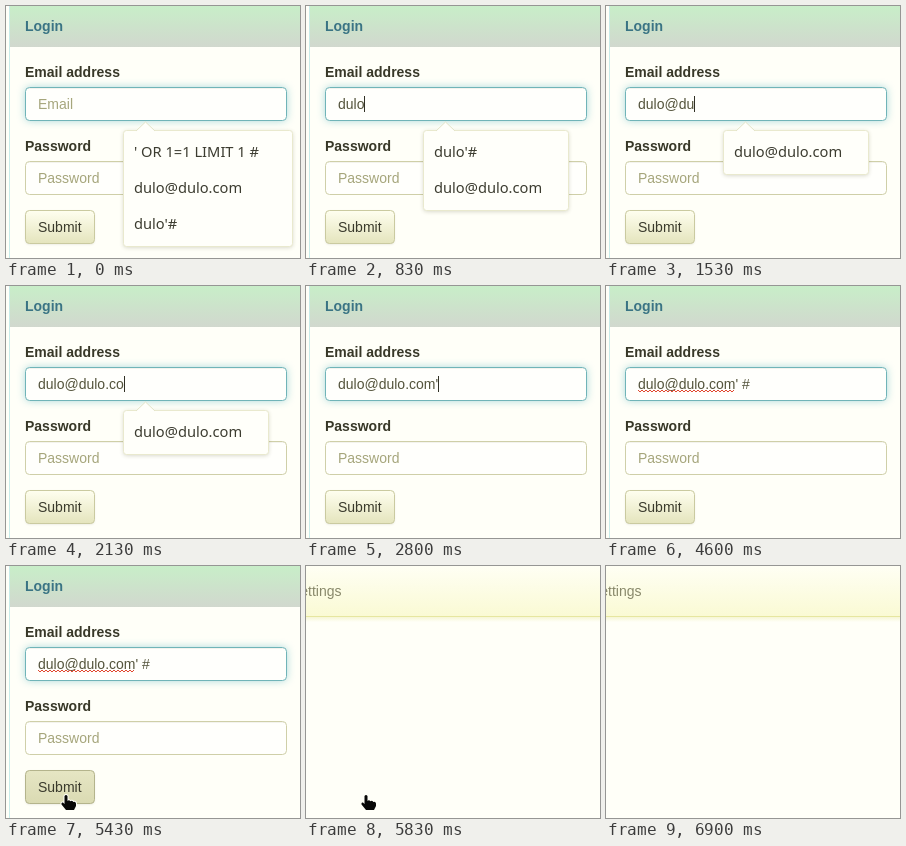
Animation, 294 px wide and 252 px high, one loop 7960 ms. Source, as an HTML page with a canvas:

```html
<!DOCTYPE html>
<html lang="en">
<head>
<meta charset="utf-8">
<title>Login form</title>
<style>
  html, body { margin: 0; width: 100%; height: 100%; overflow: hidden; background: #fffff8; }
  canvas { display: block; width: 294px; height: 252px; }
</style>
</head>
<body>
<canvas id="stage" width="294" height="252"></canvas>
<script>
const ctx = document.getElementById('stage').getContext('2d');
const W = 294, H = 252, LOOP = 7960;
const SANS = '14px "Liberation Sans", Arial, sans-serif';
const MENU = '14.67px "Noto Sans", "Open Sans", sans-serif';
const PAPER = '#fffff8';

const EMAIL = 'dulo@dulo.com';
const TYPED = EMAIL + "' #";
const KEY_TIMES = [210, 380, 550, 710, 1130, 1330, 1480, 1620, 1760, 1900, 2000, 2100, 2230, 2800, 3150, 3450];
const LAST_KEY = 3450, BLINK = 600;
const HOVER = 5230, PRESS = 5560, LOADED = 5830, HAND_OFF = 6500, LEAVE = 6800, GONE = 6900;
const POINTER = [[4660, 296, 222], [4860, 226, 233], [5060, 132, 236], [5230, 76, 231], [5340, 60, 229]];

function text(str, x, y, color, font = SANS, align = 'left') {
  ctx.font = font;
  ctx.fillStyle = color;
  ctx.textAlign = align;
  ctx.fillText(str, x, y);
}

function gradient(y0, y1, top, bottom) {
  const g = ctx.createLinearGradient(0, y0, 0, y1);
  g.addColorStop(0, top);
  g.addColorStop(1, bottom);
  return g;
}

function box(x, y, w, h, r, fill, border, glow) {
  ctx.save();
  ctx.beginPath();
  ctx.roundRect(x + .5, y + .5, w - 1, h - 1, r);
  if (glow) {
    ctx.shadowColor = glow.color;
    ctx.shadowBlur = glow.blur;
    ctx.shadowOffsetY = glow.dy || 0;
  }
  ctx.fillStyle = fill;
  ctx.fill();
  ctx.shadowColor = 'transparent';
  ctx.strokeStyle = border;
  ctx.stroke();
  ctx.restore();
}

function field(y, focused) {
  box(19, y, 262, 34, 4, '#fffffc', focused ? '#70b4b8' : '#cfcfa8',
    focused && { color: 'rgba(110,190,200,.65)', blur: 8 });
  ctx.fillStyle = 'rgba(60,60,30,.06)';
  ctx.fillRect(22, y + 1, 256, 1);
}

function squiggle(x0, x1, y) {
  ctx.beginPath();
  for (let x = x0; x <= x1; x += 2) ctx.lineTo(x, y + ((x - x0) % 4 ? 1 : -1));
  ctx.strokeStyle = '#e04830';
  ctx.lineWidth = 1;
  ctx.stroke();
}

function emailField(t, count) {
  field(81, t < PRESS);
  const value = TYPED.slice(0, count);
  text(value || 'Email', 32, 103, value ? '#54543c' : '#a6a67c');
  if (!value) return;
  const end = 32 + ctx.measureText(value).width;
  if (count >= 15) squiggle(32, 32 + ctx.measureText(EMAIL).width, 105);
  const caretOn = t < LAST_KEY || Math.floor((t - LAST_KEY) / BLINK) % 2 === 0;
  if (caretOn && t < PRESS) {
    ctx.fillStyle = '#303024';
    ctx.fillRect(Math.round(end), 90, 1, 16);
  }
}

function suggestions(count) {
  if (count === 0) return ["' OR 1=1 LIMIT 1 #", EMAIL, "dulo'#"];
  if (count < 5) return ["dulo'#", EMAIL];
  return count < EMAIL.length ? [EMAIL] : [];
}

function popup(items) {
  if (!items.length) return;
  const width = items.length === 3 ? 170 : 146;
  const height = 9 + 36 * items.length;
  box(117, 124, width, height, 3, '#fffffa', '#e9e9ce',
    { color: 'rgba(80,80,40,.25)', blur: 4, dy: 1 });
  ctx.beginPath();
  ctx.moveTo(130, 125);
  ctx.lineTo(139.5, 116);
  ctx.lineTo(149, 125);
  ctx.fillStyle = '#fffffa';
  ctx.fill();
  ctx.strokeStyle = '#e4e4c8';
  ctx.stroke();
  items.forEach((item, i) => text(item, 128, 151 + 36 * i, '#3c3c30', MENU));
}

function submitButton(t) {
  const hover = t >= HOVER, pressed = t >= PRESS;
  const fill = hover ? gradient(204, 238, '#e6e6c4', '#dadab2') : gradient(204, 238, '#fffff0', '#e4e4bc');
  box(19, 204, 70, 34, 4, pressed ? '#d8d8b0' : fill, hover ? '#b4b48c' : '#cacaa0',
    { color: 'rgba(60,60,30,.12)', blur: 2, dy: 1 });
  text('Submit', 32, 226, '#3a3a2c');
}

function loginPage(t) {
  ctx.fillStyle = gradient(0, 41, '#c8eec8', '#d1d8ce');
  ctx.fillRect(4, 0, W, 41);
  ctx.fillStyle = '#c8ecea';
  ctx.fillRect(3, 0, 1, H);
  const bold = 'bold ' + SANS;
  text('Login', 19, 25, '#3a7484', bold);
  text('Email address', 19, 71, '#383828', bold);
  text('Password', 19, 145, '#383828', bold);

  const count = KEY_TIMES.filter(k => k <= t).length;
  emailField(t, count);
  field(155, false);
  text('Password', 32, 177, '#a6a67c');
  submitButton(t);
  popup(suggestions(count));
}

function settingsPage() {
  ctx.fillStyle = gradient(0, 50, '#fffff4', '#fafad4');
  ctx.fillRect(0, 0, W, 50);
  ctx.fillStyle = '#e6e6a0';
  ctx.fillRect(0, 50, W, 1);
  ctx.fillStyle = gradient(51, 56, '#f6f6d4', PAPER);
  ctx.fillRect(0, 51, W, 5);
  text('Settings', 35.5, 30, '#88886a', SANS, 'right');
}

const ARROW = new Path2D('M0 0V15L3.6 11.8L6 17.5L8.6 16.4L6.2 10.9H11Z');
const HAND = new Path2D('M-1.5 1Q0 -1 1.5 1V6Q3 4.5 4.5 6.3Q6 5 7.3 7Q9.5 6 10 8.5V11L8 15H0L-4.5 9.5Q-5 7 -3 7.5L-1.5 9Z');

function drawPointer(path, x, y) {
  ctx.save();
  ctx.translate(x, y);
  ctx.lineJoin = 'round';
  ctx.lineWidth = 2;
  ctx.strokeStyle = '#fffff8';
  ctx.stroke(path);
  ctx.fillStyle = '#080808';
  ctx.fill(path);
  ctx.restore();
}

function pointerAt(t) {
  const next = POINTER.findIndex(p => p[0] > t);
  if (next < 0) return POINTER[POINTER.length - 1].slice(1);
  const [t0, x0, y0] = POINTER[next - 1], [t1, x1, y1] = POINTER[next];
  const k = (t - t0) / (t1 - t0);
  return [x0 + (x1 - x0) * k, y0 + (y1 - y0) * k];
}

function pointer(t) {
  if (t < POINTER[0][0] || t >= GONE) return;
  const [x, y] = pointerAt(t);
  const drift = Math.max(0, t - LEAVE) / (GONE - LEAVE);
  const onLink = t >= HOVER && t < HAND_OFF;
  drawPointer(onLink ? HAND : ARROW, x + 7 * drift, y + 4 * drift);
}

function render(t) {
  ctx.fillStyle = PAPER;
  ctx.fillRect(0, 0, W, H);
  if (t < LOADED) loginPage(t); else settingsPage();
  pointer(t);
}

const start = performance.now();
function tick() {
  render((performance.now() - start) % LOOP);
  requestAnimationFrame(tick);
}
tick();
</script>
</body>
</html>
```
